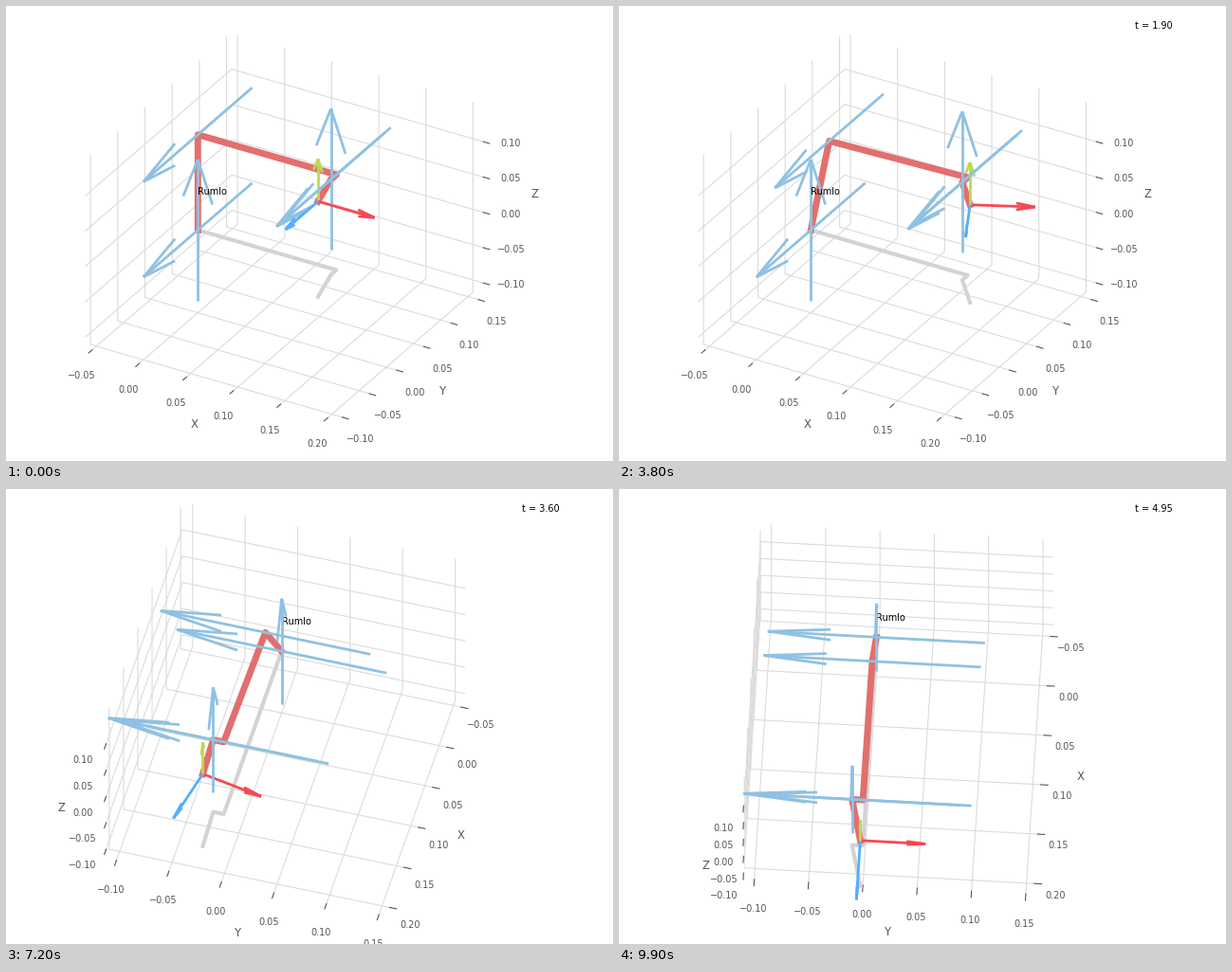
Animation of 640 by 480 pixels, one loop 10000 ms. Source, as a matplotlib script:

```python
import numpy as np
import matplotlib.pyplot as plt
from matplotlib.animation import FuncAnimation

plt.rcParams.update({
    "font.family": "DejaVu Sans",
    "font.size": 7,
    "lines.linewidth": 0.5,
    "axes.labelsize": "large",
    "axes.labelpad": 1,
    "axes.labelcolor": "#555555",
    "axes.edgecolor": "white",
    "axes.linewidth": 1,
    "xtick.color": "#555555",
    "ytick.color": "#555555",
    "grid.color": "#dbdbdb",
    "grid.linestyle": "-",
})

FRAMES, STEP_MS, DT = 100, 100, 0.05

UPPER, FORE = 0.135, 0.147      # arm link lengths
OFFSET = 0.01                   # wrist offset along -y
TOOL_X, TOOL_Z = 0.01, 0.041    # tool tip in the hand frame
AXIS, HAND = 0.1, 0.06          # half joint axis, hand axis length

JOINT_COLOR = "#8FC1E2"
HAND_COLORS = ("#F84752", "#BADA55", "#54AEFF")

X, Y, Z = np.eye(3)

# Camera: frame, azimuth, elevation
VIEW = np.array([
    (65, -60, 30),
    (66, -48, 31),
    (72, 15.2, 49.8),
    (83, 4.5, 57),
    (88, 3.375, 65.6),
])

fig = plt.figure(figsize=(6.4, 4.8), dpi=100, facecolor="white")
fig.subplots_adjust(left=-0.09, bottom=0, top=1, right=0.99)
ax = fig.add_subplot(111, projection="3d", proj_type="ortho")
ax.set_facecolor("white")

half = 0.2585 / 2 * 25 / 24
ax.set_xlim(0.0785 - half, 0.0785 + half)
ax.set_ylim(0.0248 - half, 0.0248 + half)
ax.set_zlim(0.0175 - half, 0.0175 + half)
ax.set_xticks(np.arange(-1, 5) * 0.05)
ax.set_yticks(np.arange(-2, 4) * 0.05)
ax.set_zticks(np.arange(-2, 3) * 0.05)
ax.set(xlabel="X", ylabel="Y", zlabel="Z")
for axis in (ax.xaxis, ax.yaxis, ax.zaxis):
    axis.set_pane_color((1, 1, 1, 0))

shadow, = ax.plot([], [], [], color="lightgrey", linewidth=3)
arm, = ax.plot([], [], [], color="#E16F6D", linewidth=5)
ax.text(0, 0, 0.05, "Rumlo")
timer = fig.text(0.85, 0.95, "")
arrows = []


def quintic(s):
    return s**3 * (10 - 15 * s + 6 * s * s)


def pose(i):
    """Points along the arm and the hand axes."""
    q = quintic(i / (FRAMES - 1))
    lean, lift, turn = 0.5 * q, 0.115 * q, np.pi / 2 * q
    base = np.zeros(3)
    elbow = UPPER * (np.sin(lean) * X + np.cos(lean) * Z)
    wrist = elbow + FORE * (np.cos(lift) * X + np.sin(lift) * Z)
    hand = wrist - OFFSET * Y
    hx = np.cos(turn) * X + np.sin(turn) * Y
    hz = np.sin(turn) * X - np.cos(turn) * Y
    tip = hand + TOOL_X * hx + TOOL_Z * hz
    return (base, elbow, wrist, hand, tip), (hx, Z, hz)


def arrow(start, vec, color):
    arrows.append(ax.quiver(*start, *vec, color=color, linewidth=2,
                            arrow_length_ratio=0.3))


def joint(center, direction):
    arrow(center - AXIS * direction, 2 * AXIS * direction, JOINT_COLOR)


def update(i):
    while arrows:
        arrows.pop().remove()
    points, axes = pose(i)
    base, elbow, wrist, hand, tip = points
    x, y, z = np.transpose(points)
    shadow.set_data_3d(x, y, np.zeros_like(z))
    arm.set_data_3d(x, y, z)

    joint(base, Z)
    for center in (base, elbow, wrist, hand):
        joint(center, -Y)
    joint(hand, Z)
    for vec, color in zip(axes, HAND_COLORS):
        arrow(tip, HAND * vec, color)

    azim, elev = (np.interp(i, VIEW[:, 0], VIEW[:, k]) for k in (1, 2))
    ax.view_init(elev=elev, azim=azim)
    timer.set_text(f"t = {i * DT:.2f}" if i else "")
    return []


anim = FuncAnimation(fig, update, frames=FRAMES, interval=STEP_MS,
                     init_func=lambda: [], repeat=True, repeat_delay=0,
                     blit=False)
plt.show()
```
